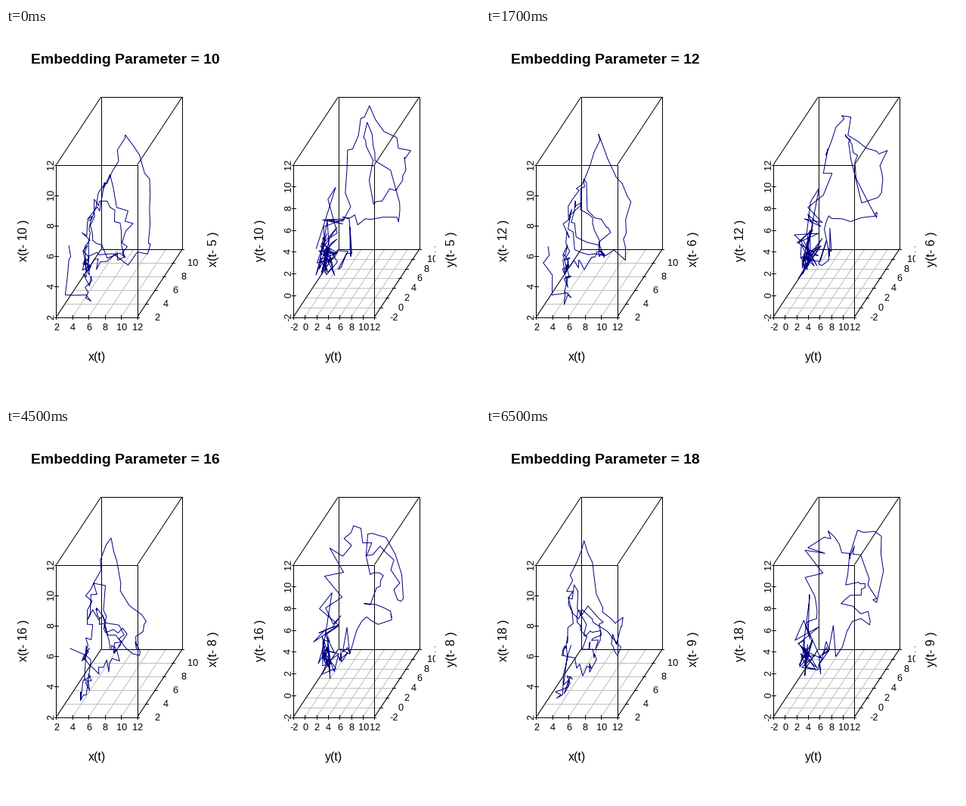
Recreate the animation shown at these times as a matplotlib script. Size 627 by 491 pixels, loop 8000 ms.

```python
import numpy as np
import matplotlib.pyplot as plt
from matplotlib.animation import FuncAnimation
from matplotlib.patches import Rectangle

W, H, DPI = 627, 491, 100
PX = 72 / DPI
BOTTOM, WIDE, TALL = 381.6, 107.3, 201
DEPTH_X, DEPTH_Y = 59.5, 89.7
NAVY, GREY = "#000080", "#bebebe"

plt.rcParams["font.family"] = "Liberation Sans"
fig = plt.figure(figsize=((W + 1e-3) / DPI, (H + 1e-3) / DPI), dpi=DPI,
                 facecolor="white")
ax = fig.add_axes([0, 0, 1, 1])
ax.set(xlim=(0, W), ylim=(H, 0))
ax.axis("off")


def project(left, a, b, c):
    """Oblique view of a point in the unit cube: across, depth, height."""
    return left + WIDE * a + DEPTH_X * b, BOTTOM - TALL * c - DEPTH_Y * b


def edge(left, p, q, color="black", z=2):
    xs, ys = zip(project(left, *p), project(left, *q))
    ax.plot(xs, ys, color=color, lw=PX, zorder=z, solid_capstyle="butt")


def tick(x, y, dx, dy):
    ax.plot([x - dx, x + dx], [y - dy, y + dy], color="black", lw=PX, zorder=2)


def label(x, y, s, size=12.8, rotation=0, **kw):
    kw = {"ha": "center", "va": "center", **kw}
    return ax.text(x, y, s, size=size * PX, rotation=rotation, **kw)


def draw_box(left, values, depth_values):
    stops = np.linspace(0, 1, len(values))
    for s in stops:
        edge(left, (s, 0, 0), (s, 1, 0), GREY, 1)
        edge(left, (0, s, 0), (1, s, 0), GREY, 1)
    for i in (0, 1):
        for j in (0, 1):
            edge(left, (0, i, j), (1, i, j))
            edge(left, (i, 0, j), (i, 1, j))
            edge(left, (i, j, 0), (i, j, 1))
    for s, v in zip(stops, values):
        x, y = project(left, s, 0, 0)
        tick(x, y, 0, 2.5)
        label(x + 0.7, 399, v, va="baseline")
        x, y = project(left, 0, 0, s)
        tick(x, y, 2.5, 0)
        label(x - 6, y - 0.5, v, rotation=90)
        x, y = project(left, 1, s, 0)
        tick(x, y, 2, 0)
        if v in depth_values:
            label(x + 26, y + 4, v, va="baseline")


def make_series(keys, top, seed, calm, rough=None, quiet_below=0):
    """Noisy series through (time, level) keys, scaled to the unit range.

    Levels under quiet_below use the rough noise, the others the calm one.
    """
    times, levels = zip(*keys)
    level = np.interp(np.arange(times[-1] + 1), times, levels)
    noise = np.random.default_rng(seed).normal(size=level.size)
    spread = np.where(level < quiet_below, rough or calm, calm)
    return np.clip(level + spread * np.clip(noise, -2.2, 2.2), 0, top) / top


def embed(left, s, m):
    """Project the delay vectors (s[t], s[t - m/2], s[t - m])."""
    half = m // 2
    return project(left, s[m:], s[half:-half], s[:-m])


# A decaying start, a restless base and three bursts of growing size.
X_KEYS = [(0, 4.4), (4, 1.4), (5, 1), (15, 0.9), (18, 3.8), (20, 3.3),
          (24, 1.9), (30, 2.7), (38, 2.2), (42, 4), (45, 5.5), (49, 5.5),
          (53, 4), (57, 2.6), (62, 2.6), (65, 4), (68, 7), (71, 5.5),
          (75, 5), (79, 3.5), (84, 2.4), (88, 2.6), (91, 4.3), (93, 6),
          (96, 9), (98, 8), (101, 6.6), (104, 6), (106, 5), (109, 4),
          (113, 3), (118, 2), (126, 2.6), (132, 1.7)]

# A brief spike, a noisy base, then a double burst that falls back.
BURST = 72
Y_KEYS = [(0, 5), (1, 10), (2, 9.5), (3, 6), (5, 3.8), (BURST - 24, 3.8),
          (BURST - 20, 6.5), (BURST - 13, 6.5), (BURST - 9, 5.1),
          (BURST - 5, 8.4), (BURST - 3, 10), (BURST - 1, 13.7), (BURST, 14),
          (BURST + 2, 13), (BURST + 5, 7), (BURST + 7, 6.5), (BURST + 9, 8),
          (BURST + 12, 9), (BURST + 16, 9.3), (BURST + 20, 13.4),
          (BURST + 22, 13.4), (BURST + 25, 12), (BURST + 30, 6.2),
          (BURST + 37, 5.8), (BURST + 41, 4), (BURST + 54, 3.8)]

PANELS = [("x", 66.4, make_series(X_KEYS, 10, 4, 0.24)),
          ("y", 380, make_series(Y_KEYS, 14, 9, 0.28, 0.85, 5))]

draw_box(66.4, [str(v) for v in range(2, 13, 2)], "2 4 6 8 10".split())
y_values = [str(v) for v in range(-2, 13, 2)]
draw_box(380, y_values, y_values)
# The last depth labels are cut off at the panel edge.
ax.add_patch(Rectangle((568, 280), 13, 34, color="white", lw=0, zorder=5))

label(120.5, 438.5, "x(t)", 16, va="baseline")
label(434, 438.5, "y(t)", 16, va="baseline")
title = label(33, 47, "", 19.4, weight="bold", ha="left", va="baseline")
full_lag = [label(x, 280, "", 16, 90) for x in (23, 336.5)]
half_lag = [label(x, 292, "", 16, 90) for x in (274.3, 589.3)]
curves = [ax.plot([], [], color=NAVY, lw=PX, zorder=3)[0] for _ in PANELS]


def update(i):
    m = 10 + 2 * ((i + 3) // 4)
    title.set_text(f"Embedding Parameter = {m}")
    for (name, left, series), full, half, curve in zip(
            PANELS, full_lag, half_lag, curves):
        full.set_text(f"{name}(t- {m} )")
        half.set_text(f"{name}(t- {m // 2} )")
        curve.set_data(*embed(left, series, m))
    return [title, *full_lag, *half_lag, *curves]


anim = FuncAnimation(fig, update, frames=16, interval=500, repeat=True,
                     repeat_delay=0, blit=False)
plt.show()
```
